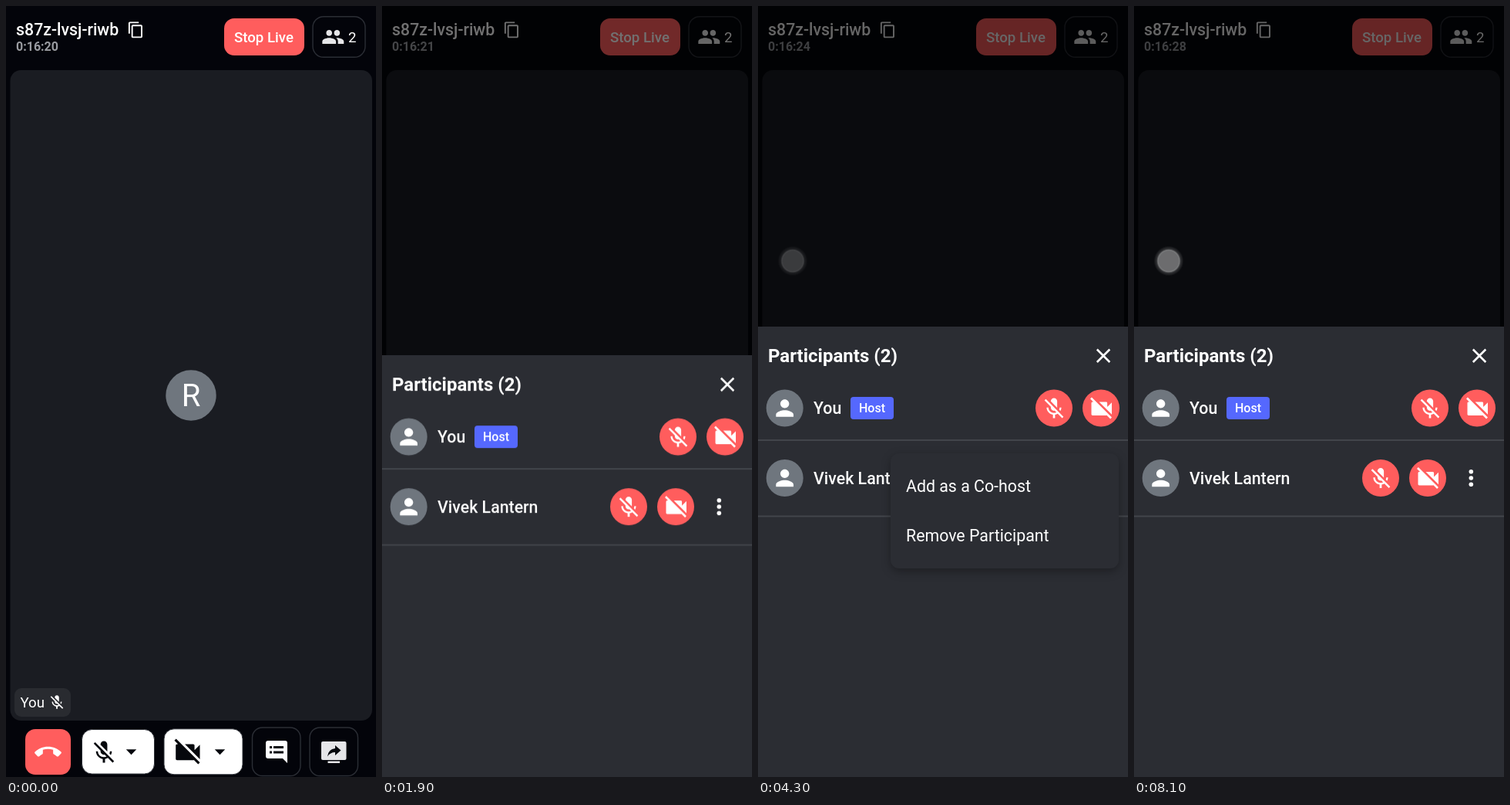
An HTML page for the animation above (8200 ms loop, 480 by 998 pixels).

```html
<!DOCTYPE html>
<html lang="en">
<head>
<meta charset="utf-8">
<title>Live call participants</title>
<style>
  html, body { margin: 0; width: 100%; height: 100%; overflow: hidden; background: #03040a; }
  svg { display: block; width: 100%; height: 100%; }
  text { font-family: Roboto, "Open Sans", sans-serif; font-size: 21.33px; fill: #fff; }
  .medium { font-weight: 500; }
  .bold { font-weight: 700; }
  .small { font-size: 18.67px; }
  .tiny { font-size: 16px; }
  .mid { text-anchor: middle; }
  .red { fill: #ff5d5d; }
  .outline { fill: none; stroke: #2b2e35; stroke-width: 1.4; }
  .ink { fill: #06080d; }
  .white { fill: #fff; }

  .scrim, .sheet, .menu, .item1, .item2, .spot { animation: 8200ms linear infinite; }
  .scrim { animation-name: dim; }
  .sheet { animation-name: rise; }
  .menu {
    animation-name: grow;
    transform-box: fill-box; transform-origin: 100% 0;
    filter: drop-shadow(0 4px 6px rgba(0, 0, 0, .3));
  }
  .item1 { animation-name: item1; }
  .item2 { animation-name: item2; }
  .spot { animation-name: tap, place; animation-timing-function: linear, step-end; }

  @keyframes dim {
    0%, 21.134% { opacity: 0; animation-timing-function: ease; }
    24.183%, 100% { opacity: .6; }
  }
  @keyframes rise {
    0%, 21.134% { transform: translateY(583px); animation-timing-function: cubic-bezier(0, 0, .2, 1); }
    24.183%, 100% { transform: none; }
  }
  @keyframes grow {
    0%, 36.1% { opacity: 0; transform: scale(0, 0); }
    37.15% { opacity: .86; transform: scale(1, .5); }
    37.32% { opacity: 1; transform: scale(1, .58); }
    38.19%, 54.71% { opacity: 1; transform: none; }
    55.28% { opacity: 1; transform: scale(1, .58); }
    55.4% { opacity: .86; transform: scale(1, .5); }
    56.1%, 100% { opacity: 0; transform: scale(0, 0); }
  }
  @keyframes item1 {
    0%, 37.15%, 55.4%, 100% { opacity: 0; }
    38.71%, 54.35% { opacity: 1; }
  }
  @keyframes item2 {
    0%, 38.19%, 54.71%, 100% { opacity: 0; }
    39.76%, 53.66% { opacity: 1; }
  }
  @keyframes tap {
    0%, 15.61%, 20.6%, 32.68%, 36.59%, 49.76%, 53.66%, 79.02%, 84.02%, 94.88% { opacity: 0; }
    15.85%, 18.29%, 32.93%, 34.76%, 50%, 51.22%, 79.27%, 81.71%, 95.12%, 100% { opacity: 1; }
  }
  @keyframes place {
    0% { transform: translate(432px, 40px); }
    25% { transform: translate(437px, 611px); }
    42%, 100% { transform: translate(45px, 330px); }
  }
</style>
</head>
<body>
<svg viewBox="0 0 480 998">
  <defs>
    <path id="copy" d="M16 1H4c-1.1 0-2 .9-2 2v14h2V3h12V1zm3 4H8c-1.1 0-2 .9-2 2v14c0 1.1.9 2 2 2h11c1.1 0 2-.9 2-2V7c0-1.1-.9-2-2-2zm0 16H8V7h11v14z"/>
    <path id="people" d="M16 11c1.66 0 3-1.34 3-3s-1.34-3-3-3-3 1.34-3 3 1.34 3 3 3zm-8 0c1.66 0 3-1.34 3-3S9.66 5 8 5 5 6.34 5 8s1.34 3 3 3zm0 2c-2.33 0-7 1.17-7 3.5V19h14v-2.5c0-2.33-4.67-3.5-7-3.5zm8 0c-.29 0-.62.02-.97.05 1.16.84 1.97 1.97 1.97 3.45V19h6v-2.5c0-2.33-4.67-3.5-7-3.5z"/>
    <path id="mic" d="M19 11h-1.7c0 .74-.16 1.43-.43 2.05l1.23 1.23c.56-.98.9-2.09.9-3.28zm-4.02.17c0-.06.02-.11.02-.17V5c0-1.66-1.34-3-3-3S9 3.34 9 5v.18l5.98 5.99zM4.27 3L3 4.27l6.01 6.01V11c0 1.66 1.33 3 2.99 3 .22 0 .44-.03.65-.08l1.66 1.66c-.71.33-1.5.52-2.31.52-2.76 0-5.3-2.1-5.3-5.1H5c0 3.41 2.72 6.23 6 6.72V21h2v-3.28c.91-.13 1.77-.45 2.54-.9L19.73 21 21 19.73 4.27 3z"/>
    <path id="cam" d="M21 6.5l-4 4V7c0-.55-.45-1-1-1H9.82L21 17.18V6.5zM3.27 2L2 3.27 4.73 6H4c-.55 0-1 .45-1 1v10c0 .55.45 1 1 1h12c.21 0 .39-.08.54-.18L19.73 21 21 19.73 3.27 2z"/>
    <path id="hangup" d="M12 9c-1.6 0-3.15.25-4.6.72v3.1c0 .39-.23.74-.56.9-.98.49-1.87 1.12-2.66 1.85-.18.18-.43.28-.7.28-.28 0-.53-.11-.71-.29L.29 13.08a1 1 0 0 1 0-1.41C3.34 8.78 7.46 7 12 7s8.66 1.78 11.71 4.67a1 1 0 0 1 0 1.42l-2.48 2.48c-.18.18-.43.29-.71.29-.27 0-.52-.11-.7-.28-.79-.74-1.69-1.36-2.67-1.85-.33-.16-.56-.5-.56-.9v-3.1C15.15 9.25 13.6 9 12 9z"/>
    <path id="caret" d="M-6.7-3.5h13.4L0 3.5z"/>
    <g id="person">
      <circle r="24" fill="#6f767e"/>
      <path class="white" transform="scale(1.42) translate(-12 -12)" d="M12 12c2.21 0 4-1.79 4-4s-1.79-4-4-4-4 1.79-4 4 1.79 4 4 4zm0 2c-2.67 0-8 1.34-8 4v2h16v-2c0-2.66-5.33-4-8-4z"/>
    </g>
    <g id="mic-off">
      <circle class="red" r="24"/>
      <use href="#mic" class="white" transform="scale(1.37) translate(-12 -11.5)"/>
    </g>
    <g id="cam-off">
      <circle class="red" r="24"/>
      <use href="#cam" class="white" transform="scale(1.47) translate(-11.5 -11.5)"/>
    </g>
    <radialGradient id="glow">
      <stop offset="0" stop-color="#fff" stop-opacity=".4"/>
      <stop offset=".64" stop-color="#fff" stop-opacity=".4"/>
      <stop offset=".71" stop-color="#fff" stop-opacity=".46"/>
      <stop offset=".8" stop-color="#fff" stop-opacity=".16"/>
      <stop offset="1" stop-color="#fff" stop-opacity="0"/>
    </radialGradient>
  </defs>

  <rect width="480" height="998" fill="#03040a"/>

  <!-- header -->
  <text class="medium" x="13" y="38">s87z-lvsj-riwb</text>
  <use href="#copy" class="white" transform="translate(157 19.5) scale(.95)"/>
  <text class="tiny bold" id="clock" x="13" y="58" style="fill:#9a9ca1">0:16:20</text>
  <rect class="red" x="283" y="16" width="104" height="48" rx="13"/>
  <text class="small medium mid" x="334.5" y="47">Stop Live</text>
  <rect class="outline" x="398" y="13.7" width="68" height="52.6" rx="14"/>
  <use href="#people" fill="#e6e6e8" transform="translate(424.3 40) scale(1.27) translate(-12 -12)"/>
  <text class="small" x="444" y="47">2</text>

  <!-- video tile -->
  <rect x="5.5" y="83" width="469.5" height="842" rx="14" fill="#1a1c22"/>
  <circle cx="240" cy="504" r="32.7" fill="#6f767e"/>
  <text class="mid" x="240" y="518" style="font-size:40px">R</text>
  <rect x="11" y="883" width="73" height="37" rx="9" fill="#292b30"/>
  <text class="small" x="18.5" y="908">You</text>
  <use href="#mic" class="white" transform="translate(66 901) scale(.92) translate(-12 -11.5)"/>

  <!-- call controls -->
  <rect class="red" x="25" y="936" width="59" height="59" rx="13"/>
  <use href="#hangup" class="white" transform="translate(54.5 965.3) scale(1.45) translate(-12 -11.5)"/>
  <g fill="#fff" stroke="#2b2e35">
    <rect x="98.5" y="936.5" width="94" height="57.5" rx="13"/>
    <rect x="205" y="935.8" width="102" height="59" rx="13"/>
  </g>
  <use href="#mic" class="ink" transform="translate(127 965.5) scale(1.47) translate(-12 -11.5)"/>
  <use href="#caret" class="ink" x="162.5" y="965.7"/>
  <use href="#cam" class="ink" transform="translate(235 965) scale(1.74) translate(-11.5 -11.5)"/>
  <use href="#caret" class="ink" x="277.5" y="965.7"/>
  <rect class="outline" x="319.5" y="934" width="62.5" height="62.5" rx="13"/>
  <path class="white" d="M340 951h22q3 0 3 3v26l-6-6h-19q-3 0-3-3v-17q0-3 3-3z"/>
  <path class="ink" d="M342 958h3v3h-3zm5 0h13v3h-13zm-5 6.500h3v3h-3zm5 0h13v3h-13z"/>
  <rect class="outline" x="394" y="934" width="62.5" height="62.5" rx="13"/>
  <g fill="#e6e6e8">
    <rect x="409" y="952" width="32.500" height="24" rx="2"/>
    <rect x="417.500" y="977.500" width="15.500" height="2.500"/>
  </g>
  <path class="ink" d="M417 971.500q1-9.500 10-10.500v-4l7.500 6.500-7.500 6.500v-4q-6.500 0-10 5.500z"/>

  <rect class="scrim" width="480" height="998"/>

  <!-- participants -->
  <g class="sheet">
    <rect y="415" width="480" height="583" fill="#2b2d33"/>
    <text class="bold" x="13" y="461" style="font-size:24px">Participants (2)</text>
    <path d="M439.800 444.500l16.500 16.500m0-16.500l-16.500 16.500" stroke="#fff" stroke-width="2.600"/>
    <path d="M0 562h480M0 660.500h480" stroke="#42454b" stroke-width="2"/>

    <use href="#person" x="34.700" y="520.500"/>
    <text class="medium" x="72" y="528">You</text>
    <rect x="120" y="506" width="56" height="29" rx="4" fill="#5568fe"/>
    <text class="tiny medium mid" x="148" y="526">Host</text>
    <use href="#mic-off" x="384" y="520.500"/>
    <use href="#cam-off" x="445" y="520.500"/>

    <use href="#person" x="34.700" y="611"/>
    <text class="medium" x="72" y="619">Vivek Lantern</text>
    <use href="#mic-off" x="320" y="611"/>
    <use href="#cam-off" x="381" y="611"/>
    <g class="white">
      <circle cx="437.300" cy="602.800" r="2.800"/>
      <circle cx="437.300" cy="611" r="2.800"/>
      <circle cx="437.300" cy="619.200" r="2.800"/>
    </g>
  </g>

  <!-- popup menu -->
  <rect class="menu" x="172" y="579" width="296" height="149" rx="11" fill="#2b2d33"/>
  <text class="item1" x="192" y="629">Add as a Co-host</text>
  <text class="item2" x="192" y="693">Remove Participant</text>

  <circle class="spot" r="19.500" fill="url(#glow)"/>
</svg>
<script>
  const clock = document.getElementById('clock');
  const [motion] = document.querySelector('.sheet').getAnimations();

  // The call clock ticks 900 ms into the loop, then every second.
  function tick() {
    const time = (motion.currentTime || 0) % 8200;
    const label = '0:16:' + (20 + Math.floor((time + 100) / 1000));
    if (clock.textContent !== label) clock.textContent = label;
    requestAnimationFrame(tick);
  }
  tick();
</script>
</body>
</html>
```
